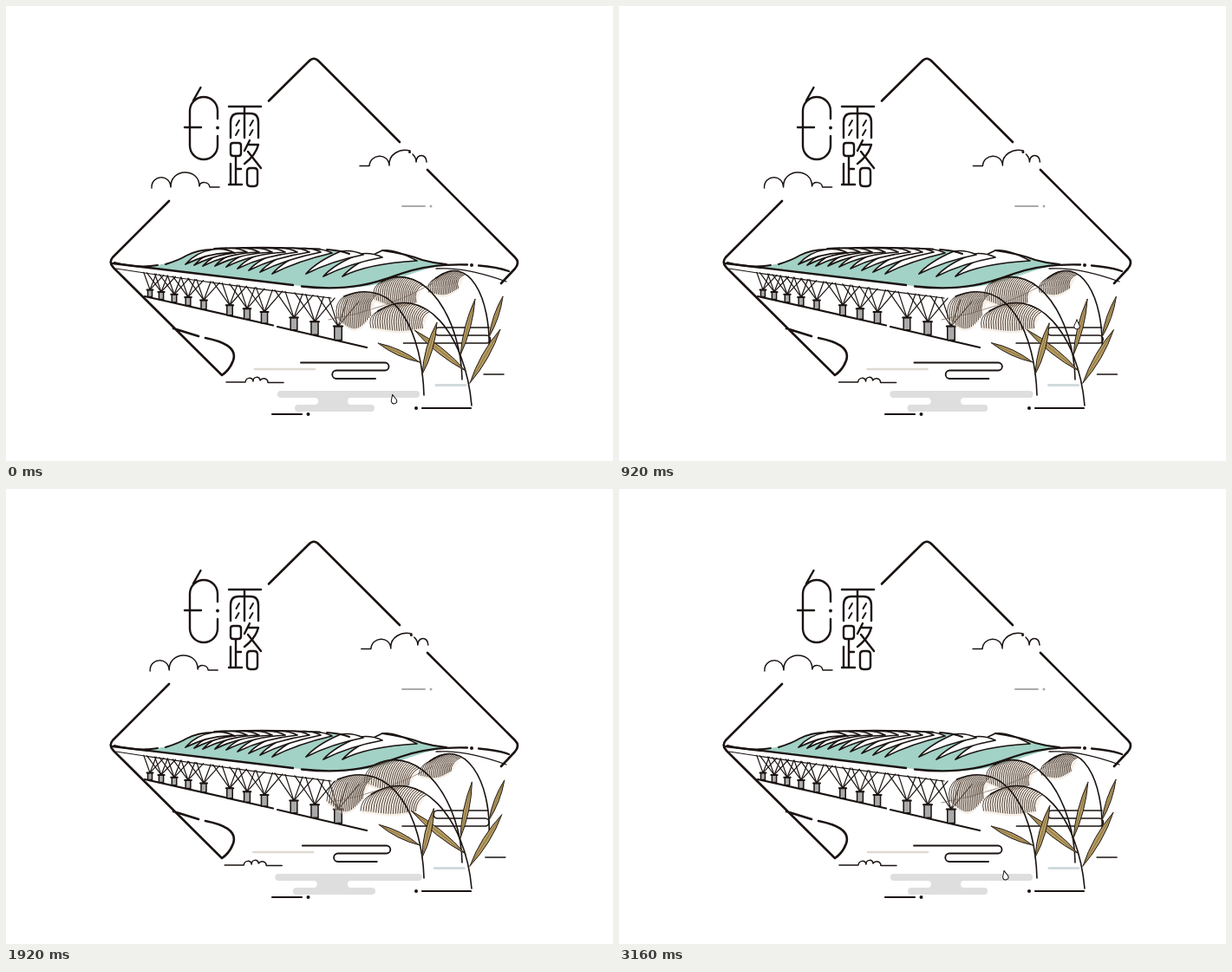
Recreate the animation shown at these times as an HTML page. Size 700 px wide and 525 px high, loop 3.2 s.

```html
<!DOCTYPE html>
<html lang="zh">
<head>
<meta charset="utf-8">
<title>白露</title>
<style>
  html, body { margin: 0; width: 100%; height: 100%; overflow: hidden; background: #fff; }
  svg { display: block; width: 700px; height: 525px; }
  g, path { stroke-linecap: round; stroke-linejoin: round; }
</style>
</head>
<body>
<svg viewBox="0 0 700 525" fill="none" stroke="#1a1311">
  <g stroke-width="2.6" id="frame">
    <path d="M303 109.500L349 64Q355 57.500 361 64L454 157"/>
    <path d="M486 189L587 290Q593 296 587 303L571 320L508 303"  stroke="none"/>
    <path d="M486 189L587 290Q593 296 587 303L571 320"/>
    <path d="M188 225L123 290Q118 296 124 302L249 426Q258 420 262 409C267 394 250 387 230 383M222 381L193 372"/>
  </g>
  <g stroke-width="2.4" id="title">
    <path d="M224.500 94L216 109M244 130V121a16 16 0 0 0-32 0V161a16 16 0 0 0 32 0V150M206 140H225"/>
    <path d="M257 116H294M275 116V152M259 152V134Q259 124 268 124H282Q291 124 291 134V152"/>
    <path d="M269 132L265.500 138M268.500 143L265 149M285 132L281.500 138M284.500 143L281 149" stroke-width="2"/>
    <path d="M262 158H268Q271 158 271 161V170Q271 173 268 173H262Q259 173 259 170V161Q259 158 262 158ZM265 173V206M259 182V206M265 188H271M257 206H272"/>
    <path d="M281 155L275 167M280 160H291Q288 172 275 182M279 168L294 187M282 187H286Q290 187 290 191V204Q290 208 286 208H282Q278 208 278 204V191Q278 187 282 187Z"/>
    <circle cx="244" cy="140.500" r="1.900" fill="#1a1311" stroke="none"/>
  </g>
  <g id="bridge" stroke-width="1.200"></g>
  <g id="hall"></g>
  <g id="still">
    <path d="M457 231H483" stroke="#aaa" stroke-width="1.800"/>
    <path d="M307 471H341M480 464H536" stroke-width="2.200"/>
    <g fill="#1a1311" stroke="none">
      <circle cx="490" cy="231" r="1.500" fill="#aaa"/>
      <circle cx="348.500" cy="471" r="2"/>
      <circle cx="473" cy="464" r="2"/>
    </g>
  </g>
  <g id="moving"></g>
</svg>
<script>
const LOOP = 3200, STEP = 40, SWAY = 800;
const byId = id => document.getElementById(id);
const path = (d, attrs = '') => `<path d="${d}" ${attrs}/>`;
const shift = (dx, body) => `<g transform="translate(${dx.toFixed(2)} 0)">${body}</g>`;

// Deck, trusses and piers
const deckY = x => 303 + (x - 127) * 0.135;
const groundY = x => 335 + (x - 160) * 0.231;
const piers = [166, 179, 194, 210, 228, 258, 278, 298, 332, 356, 383];

function drawBridge() {
  let out = path('M127 303Q230 319 375 337')
    + path('M160 335L308 368.500M313 370L416 394', 'stroke-width="2.2"');
  for (const x of piers) {
    const scale = (x - 166) / 217, w = 5 + 3.5 * scale, h = 8 + 8 * scale;
    const bottom = groundY(x) - 1, top = bottom - h;
    const reach = 16 + 8 * scale;
    for (const dx of [-reach, -reach * 0.45, reach * 0.45, reach]) {
      if (x + dx > 150) out += path(`M${x} ${top}L${x + dx} ${deckY(x + dx)}`);
    }
    out += `<rect x="${x - w / 2}" y="${top}" width="${w}" height="${h}" fill="#aaa" stroke-width="1.5"/>`
      + path(`M${x - w / 2 - 1} ${top}h${w + 2}`, 'stroke-width="2"');
  }
  byId('bridge').innerHTML = out;
}

// Roof: teal body with overlapping white sails, each [tip x, tip y, crest x, crest y]
const sails = [
  [207, 298, 238, 281], [217, 299, 252, 280], [227, 300, 266, 280], [241, 300, 281, 280],
  [254, 301, 296, 280], [267, 303, 310, 280], [280, 305, 324, 280], [293, 307, 337, 280],
  [307, 309, 350, 281], [346, 309, 386, 283], [366, 312, 408, 286], [388, 312, 434, 282]
];

function drawHall() {
  const teal = 'M160 301Q185 299 205 290Q220 283 245 282H360L440 287Q480 292 508 298C465 306 440 325 390 325Q362 326 331 322Z';
  let out = path(teal, 'fill="#a2d1c5" stroke="none"');
  for (const [tx, ty, cx, cy] of [...sails].reverse()) {
    const last = cx > 430;
    const end = last ? [cx + 40, cy + 12] : [cx + 26, cy + 4];
    out += path(`M${tx} ${ty}Q${tx + 12} ${ty - 14} ${cx} ${cy}Q${cx + 14} ${cy - 2} ${end}Q${tx + 30} ${ty - 15} ${tx} ${ty}Z`,
      'fill="#fff" stroke-width="1.7"');
  }
  out += path('M123 297L331 322M341 323.500C400 330 430 318 455 309Q490 297 532 298.500M545 299.500Q566 301 580 306', 'stroke-width="2.3"')
    + path('M125 296Q152 303 175 299M184 298Q200 293 208 288Q222 281 238 281M240 280Q300 277 362 280.500M370 281Q386 282 396 286M434 282Q462 286 480 293Q494 297 508 298', 'stroke-width="1.9"')
    + path('M496 303Q530 301 577 318', 'stroke-width="1.3"')
    + '<circle cx="537" cy="299" r="2" fill="#1a1311" stroke="none"/>';
  byId('hall').innerHTML = out;
}

// Reeds: cubic stem as eight coordinates, start of the plume, hair count, hair length
const reeds = [
  { stem: [557, 401, 560, 335, 530, 285, 491, 314], from: 0.66, hairs: 18, length: 27 },
  { stem: [526, 431, 525, 365, 482, 292, 428, 318], from: 0.66, hairs: 22, length: 34 },
  { stem: [537, 461, 530, 380, 480, 318, 424, 352], from: 0.6, hairs: 24, length: 32 },
  { stem: [482, 449, 480, 380, 448, 310, 385, 335], from: 0.76, hairs: 19, length: 42 }
];

function cubic(p, t) {
  const s = 1 - t, k = [s * s * s, 3 * s * s * t, 3 * s * t * t, t * t * t];
  return [0, 1].map(axis => k.reduce((sum, w, i) => sum + w * p[2 * i + axis], 0));
}

function reed({ stem, from, hairs, length }, lean) {
  const p = stem.slice();
  p[4] += lean;
  p[6] += lean * 1.6;
  let strands = '', roots = [], ends = [];
  for (let i = 0; i < hairs; i++) {
    const k = i / (hairs - 1);
    const [x, y] = cubic(p, from + (1 - from) * k);
    const len = length * (0.6 + 0.4 * Math.sin(Math.PI * k));
    const ex = x - 11 + lean, ey = y + len;
    strands += `M${x.toFixed(1)} ${y.toFixed(1)}Q${(x - 12).toFixed(1)} ${(y + len * 0.3).toFixed(1)} ${ex.toFixed(1)} ${ey.toFixed(1)}`;
    roots.push([x, y]);
    ends.unshift([ex, ey + 3]);
  }
  return path('M' + [...roots, ...ends].join('L') + 'Z', 'fill="#ead9c6" fill-opacity=".4" stroke="none"')
    + path(strands, 'stroke="#37291f" stroke-width=".9"')
    + path(`M${p[0]} ${p[1]}C${p.slice(2)}`, 'stroke-width="1.6"');
}

// Leaves: base, tip, tip travel, width
const leaves = [
  [557, 382, 573, 335, 2, 1, 5], [524, 403, 541, 338, -4, 0, 6],
  [535, 435, 570, 373, 2, 3, 7], [530, 421, 471, 374, -4, -3, 7],
  [480, 425, 497, 365, -4, 4, 7], [477, 411, 429, 389, 1, -2, 6]
];

function leaf([bx, by, tx, ty, dx, dy, width], u) {
  tx += dx * u;
  ty += dy * u;
  const len = Math.hypot(tx - bx, ty - by);
  const nx = -(ty - by) / len * width, ny = (tx - bx) / len * width;
  const mx = (bx + tx) / 2, my = (by + ty) / 2;
  return path(`M${bx} ${by}Q${mx + nx} ${my + ny} ${tx} ${ty}Q${mx - nx} ${my - ny} ${bx} ${by}Z`,
    'fill="#b59b60" stroke-width="1"') + path(`M${bx} ${by}L${tx} ${ty}`, 'stroke="#6e5a31" stroke-width=".6"');
}

// Drops accelerate along a slightly slanted line
function drop(time, start, x, y, drift, tilt) {
  const dt = (time - start + LOOP) % LOOP;
  if (dt > 860) return '';
  const fall = 1.6e-4 * dt * dt;
  const grow = Math.min(1, 0.55 + dt / 400);
  const alpha = Math.min(1, (860 - dt) / 120);
  return `<g transform="translate(${x + drift * fall} ${y + fall}) rotate(${tilt}) scale(${grow})" opacity="${alpha}">`
    + path('M0-5.500C1-2 3.200 0 3.200 2.200A3.200 3.200 0 0 1-3.200 2.200C-3.200 0-1-2 0-5.500Z', 'fill="#fff" stroke-width="1"') + '</g>';
}

function scenery(u) {
  const thin = 'stroke-width="1.5"', d = 2 * u;
  const fog = path('M317 444H473a4 4 0 0 1 0 8H398a4 4 0 0 0 0 8H421a4 4 0 0 1 0 8H337a4 4 0 0 1 0-8H356a4 4 0 0 0 0-8H317a4 4 0 0 1 0-8Z',
    'fill="#dedede" stroke="none"');
  return shift(-d, path('M168 210C167 195 189 193 190 209C189 187 223 186 223 208C224 202 234 202 235 209H246', thin)
      + path('M254 434H276C277 428 284 428 285 433C285 427 293 427 293 432C296 428 302 430 302 434.500H320', thin)
      + path('M287 419H356', 'stroke="#dedad2" stroke-width="2.5"')
      + path('M496 437.500H530', 'stroke="#d2dadd" stroke-width="3"'))
    + shift(d, path('M408 184.500H419C420 170 441 169 442 184C441 171 454 164 466 167M469 171Q473 175 473 180C473 170 485 170 485 180', thin)
      + '<circle cx="465.500" cy="168.500" r="1.500" fill="#1a1311" stroke="none"/>'
      + path('M340 411.500H437a4.500 4.500 0 0 1 0 9H381a4.700 4.700 0 0 0 0 9.500H426', 'stroke-width="1.8"')
      + path('M551 425H574', thin))
    + shift(-d * 0.8, path('M557 371H499a4.500 4.500 0 0 0 0 9H554a4.500 4.500 0 0 1 0 9H458.500', 'stroke-width="1.7"'))
    + `<g transform="translate(395 0) scale(${1 + 0.037 * u} 1) translate(-395 0)">${fog}</g>`;
}

function render(time) {
  const u = (1 - Math.cos(2 * Math.PI * time / SWAY)) / 2;
  byId('moving').innerHTML = scenery(u)
    + path('M372 362Q440 350 492 320', 'stroke="#6b5446" stroke-width=".7"')
    + reeds.map(r => reed(r, 3 - 5 * u)).join('')
    + leaves.map(l => leaf(l, u)).join('')
    + drop(time, 640, 527, 355, 0.08, 0)
    + drop(time, 2560, 433.500, 388, 0.205, -14);
}

function tick() {
  const time = performance.now() % LOOP;
  render(Math.floor(time / STEP) * STEP);
  requestAnimationFrame(tick);
}

drawBridge();
drawHall();
tick();
</script>
</body>
</html>
```
